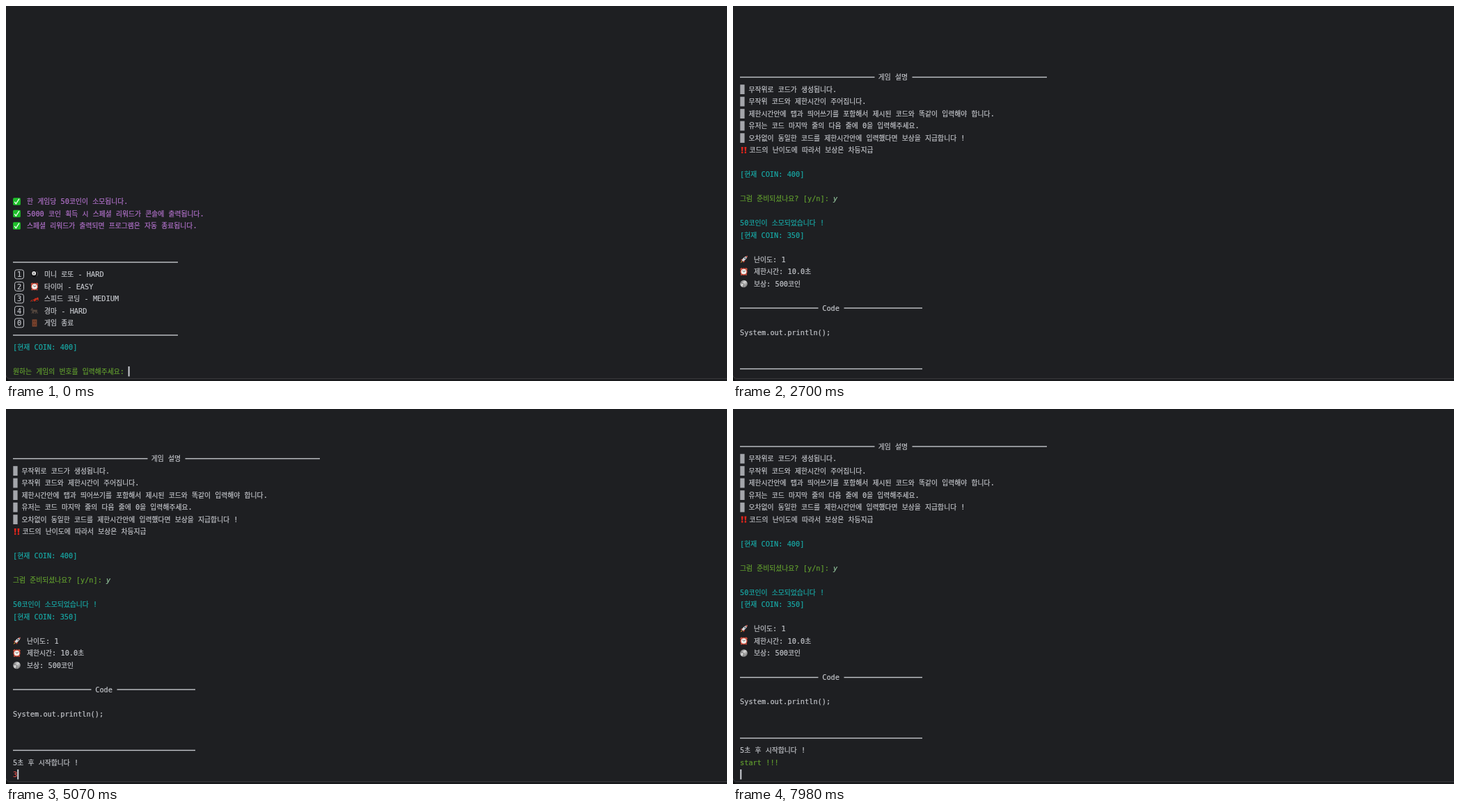
An HTML page for the animation above (8000 ms loop, 1036 px wide and 540 px high).

```html
<!DOCTYPE html>
<html lang="ko">
<head>
<meta charset="utf-8">
<title>Console game</title>
<style>
  html, body { margin: 0; width: 100%; height: 100%; overflow: hidden; background: #1e1f22; }
  svg { display: block; width: 100%; height: 100%; }
  text { white-space: pre; font: 10.3px "DejaVu Sans Mono", monospace; stroke-width: .18px; }
  .ko { font: 9.8px "Noto Sans CJK KR", "Noto Sans CJK JP", "Noto Sans CJK", sans-serif; }
  .time { font: 9.2px Inter, Roboto, sans-serif; }
  .input { font-style: italic; }
</style>
</head>
<body>
<svg id="stage" viewBox="0 0 1036 540">
  <defs>
    <linearGradient id="silver" x1="0" y1="0" x2="1" y2="1">
      <stop offset="0.1" stop-color="#6c6c6e"/><stop offset="0.45" stop-color="#d8d8d8"/><stop offset="1" stop-color="#555"/>
    </linearGradient>
    <!-- icons are centred on 0,0 -->
    <g id="check">
      <rect x="-5.4" y="-5.3" width="10.8" height="10.6" rx="1.6" fill="#1fbf2b"/>
      <path d="M-3.2 .4 L-1.2 3.4 L3.4 -3.9" fill="none" stroke="#f2fff2" stroke-width="1.3"/>
    </g>
    <g id="ball">
      <circle cy="-.8" r="4.8" fill="#0c0c0e"/>
      <path d="M2.6 -4.6 A4.6 4.6 0 0 1 2.6 2.8" fill="none" stroke="#6d6d70" stroke-width=".9"/>
      <circle cx="-.8" cy="-1.6" r="2.9" fill="#e4e4e4"/>
      <circle cx="-.9" cy="-2.4" r=".7" fill="#333"/><circle cx="-.9" cy="-.8" r=".8" fill="#333"/>
    </g>
    <g id="clock">
      <path d="M-5 -3 L-2.6 -5 M5 -3 L2.6 -5 M-3 3.5 L-4 5.2 M3 3.5 L4 5.2" stroke="#c5523f" stroke-width="1.8"/>
      <circle r="4.5" fill="#f1eeea" stroke="#cf4b3b" stroke-width="1.3"/>
      <path d="M-1.8 -1.4 L0 .2 L2.2 -1.2" fill="none" stroke="#333" stroke-width=".8"/>
    </g>
    <g id="car">
      <path d="M-5.7 4.2 L-5 2.2 L-.5 .8 L1 -1 L3 -.6 L3.6 -2 L5.6 -1.6 L5.8 3.6 Z" fill="#c5301f"/>
      <circle cx="-2.4" cy="3.7" r="1.7" fill="#111"/><circle cx="3.5" cy="3.4" r="2" fill="#111"/>
      <circle cx="-2.4" cy="3.7" r=".6" fill="#888"/><circle cx="3.5" cy="3.4" r=".7" fill="#888"/>
    </g>
    <g id="horse" transform="scale(-1 1)">
      <path d="M-4 -.8 L2 -1 L3.4 -3.6 L5 -1.4 L3.4 -.8 L2.6 1.4 L4 3.8 M2 1 L.8 4 M-3 1 L-4.6 3.8 M-2 1 L-1.6 4" fill="none" stroke="#50443d" stroke-width="1.2"/>
      <path d="M-4.2 -1 L2.4 -1.2 L2.6 1.2 L-3.4 1.4 Z" fill="#54483f"/>
      <path d="M-4 -.8 Q-5.4 0 -5.2 2" fill="none" stroke="#222" stroke-width="1"/>
    </g>
    <g id="door">
      <rect x="-3.4" y="-5.2" width="6.8" height="10.4" fill="#7d4630"/>
      <path d="M-2 -3.8 h1.4 v3 h-1.4z M.6 -3.8 h1.4 v3 h-1.4z M-2 .8 h1.4 v3 h-1.4z M.6 .8 h1.4 v3 h-1.4z" fill="#5d3020"/>
    </g>
    <g id="bang" fill="#e0261c">
      <path d="M-3.8 -4.6 h3 l-.7 6 h-1.6z M.9 -4.6 h3 l-.7 6 h-1.6z"/>
      <circle cx="-2.3" cy="3.4" r="1.3"/><circle cx="2.4" cy="3.4" r="1.3"/>
    </g>
    <g id="rocket">
      <path d="M-2.6 -.8 L-5 1.2 L-2 1.4 L-1 2.4 L-.6 5 L1.8 2.2 Z" fill="#c23a2c"/>
      <path d="M5.2 -5.2 Q1 -5 -3 1 L-1 3 Q5 -1 5.2 -5.2Z" fill="#d6d8da"/>
      <path d="M5.2 -5.2 L2.4 -4.5 L4.5 -2.4Z" fill="#c23a2c"/>
      <circle cx="1.8" cy="-1.8" r="1.1" fill="#4a5a68"/>
      <path d="M-3 2 L-5 5 L-2 3.2Z" fill="#f0a030"/>
    </g>
    <g id="coin"><circle r="5.3" fill="url(#silver)"/><path d="M-4.9 -2 L.5 .3 L-1 5" fill="none" stroke="#555" stroke-width=".7"/></g>
  </defs>

  <rect width="1036" height="540" fill="#1e1f22"/>
  <g id="menu"></g>
  <g id="game"></g>
  <rect id="caret" width="2" height="14.4" y="519" fill="#ced0d6"/>

  <g id="player" fill="#d8d8d8">
    <rect x="414.5" y="402" width="319" height="50" rx="6" fill="#1b2421"/>
    <path d="M547.5 413 v9.6 l-8.2 -4.8z M555.5 413 v9.6 l-8.2 -4.8z M593.5 413 v9.6 l8.2 -4.8z M601.3 413 v9.6 l8.2 -4.8z"/>
    <rect x="568" y="408.5" width="5.3" height="18.5" rx="1"/>
    <rect x="576" y="408.5" width="5.3" height="18.5" rx="1"/>
    <g fill="none" stroke="#b8b8b8">
      <path d="M664 421.5 h-3.2 q-1.5 0 -1.5 -1.5 v-6.4 q0 -1.5 1.5 -1.5 h8.6 q1.5 0 1.5 1.5 v2"/>
      <path d="M662 416.8 v-2.2 h2.2 M662 414.6 l3 3"/>
      <path d="M692.4 415.3 h-2.6 v8.2 h9.2 v-8.2 h-2.6 M694.4 419.5 v-8 M691.8 413.8 l2.6 -2.6 l2.6 2.6"/>
      <path d="M715.6 413.2 l4.3 4.4 l-4.3 4.4 M720.6 413.2 l4.3 4.4 l-4.3 4.4"/>
    </g>
    <rect x="665" y="416.8" width="8.8" height="6.6" rx="1.2" fill="#b8b8b8"/>
    <rect x="458" y="439.4" width="233" height="2" rx="1" fill="#56575a"/>
    <rect x="458" y="439.4" width="87" height="2" rx="1" fill="#958a8c"/>
    <rect x="543.8" y="435.2" width="2" height="10.6" rx="1"/>
    <text id="elapsed" class="time" x="423.4" y="443.6" fill="#bebebe"></text>
    <text class="time" x="701.4" y="443.6" fill="#bebebe">01:48</text>
  </g>

  <path d="M0 533 Q1 540 7 540 H0Z" fill="#0e0f10"/>
  <path d="M0 532 Q1 536.5 6 536.5 H1036" fill="none" stroke="#38373a" stroke-width="1"/>
  <rect x="5" y="538.6" width="1031" height="1.4" fill="#17181a"/>
</svg>
<script>
const NS = 'http://www.w3.org/2000/svg';
const LOOP = 8000, LEFT = 10, CELL = 6.2, ROW = 17.5;
const C = { white: '#c4c6cb', purple: '#b272cb', green: '#629f2f', cyan: '#18a9a6', red: '#e0504c', input: '#93c49c' };
const $ = id => document.getElementById(id);

function add(parent, tag, attrs, content) {
  const el = document.createElementNS(NS, tag);
  for (const k in attrs) el.setAttribute(k, attrs[k]);
  if (content) el.textContent = content;
  return parent.appendChild(el);
}

function tint(el, color) {
  el.setAttribute('fill', color);
  el.setAttribute('stroke', color);
}

// Hangul and Latin runs use their own font
function write(parent, x, y, str, color = C.white, cls = '') {
  const el = add(parent, 'text', { x, y: y + 3.7, class: cls });
  tint(el, color);
  for (const run of str.split(/([\uac00-\ud7a3]+)/)) {
    if (run) add(el, 'tspan', /[\uac00-\ud7a3]/.test(run) ? { class: 'ko' } : {}, run);
  }
  return el;
}
const rule = (g, x1, x2, y) => add(g, 'rect', { x: x1, y: y - 0.7, width: x2 - x1, height: 1.4, fill: C.white });
const icon = (g, name, x, y) => add(g, 'use', { href: '#' + name, x, y });
const show = (el, on) => el.setAttribute('visibility', on ? 'visible' : 'hidden');
const clamp = v => Math.max(0, Math.min(1, v));

// Menu
const menu = $('menu');
['한 게임당 50코인이 소모됩니다.',
 '5000 코인 획득 시 스페셜 리워드가 콘솔에 출력됩니다.',
 '스페셜 리워드가 출력되면 프로그램은 자동 종료됩니다.'].forEach((s, i) => {
  const y = 281.5 + i * ROW;
  icon(menu, 'check', 15.5, y);
  write(menu, 30, y, s, C.purple);
});
rule(menu, 10, 247, 369);
[['1', 'ball', '미니 로또 - HARD'], ['2', 'clock', '타이머 - EASY'], ['3', 'car', '스피드 코딩 - MEDIUM'],
 ['4', 'horse', '경마 - HARD'], ['0', 'door', '게임 종료']].forEach(([key, pic, s], i) => {
  const y = 386.5 + i * ROW;
  add(menu, 'rect', { x: 12.5, y: y - 6.6, width: 13, height: 13, rx: 3, fill: 'none', stroke: C.white });
  write(menu, 15.9, y, key);
  icon(menu, pic, 41, y);
  write(menu, 55, y, s);
});
rule(menu, 10, 247, 474);
write(menu, LEFT, 491.5, '[현재 COIN: 400]', C.cyan);
write(menu, LEFT, 526.5, '원하는 게임의 번호를 입력해주세요: ', C.green);
const choice = write(menu, 176, 526.5, '3', C.input, 'input');

// Game log, rows counted from its title
const game = $('game'), at = n => n * ROW;
rule(game, 10, 203.5, 0);
write(game, 208.8, 0, '게임 설명');
rule(game, 257.5, 451, 0);
['무작위로 코드가 생성됩니다.',
 '무작위 코드와 제한시간이 주어집니다.',
 '제한시간안에 탭과 띄어쓰기를 포함해서 제시된 코드와 똑같이 입력해야 합니다.',
 '유저는 코드 마지막 줄의 다음 줄에 0을 입력해주세요.',
 '오차없이 동일한 코드를 제한시간안에 입력했다면 보상을 지급합니다 !'].forEach((s, i) => {
  const y = at(i + 1);
  add(game, 'rect', { x: 10.3, y: y - 6.8, width: 6.3, height: 13.8, fill: '#a4a6ab' });
  write(game, 22.5, y, s);
});
icon(game, 'bang', 15.5, at(6));
write(game, 23.4, at(6), '코드의 난이도에 따라서 보상은 차등지급');
write(game, LEFT, at(8), '[현재 COIN: 400]', C.cyan);
write(game, LEFT, at(10), '그럼 준비되셨나요? [y/n]: ', C.green);
const answer = write(game, 144, at(10), 'y', C.input, 'input');

const round = add(game, 'g', {});
write(round, LEFT, at(12), '50코인이 소모되었습니다 !', C.cyan);
write(round, LEFT, at(13), '[현재 COIN: 350]', C.cyan);
[['rocket', '난이도: 1'], ['clock', '제한시간: 10.0초'], ['coin', '보상: 500코인']].forEach(([pic, s], i) => {
  icon(round, pic, 15.5, at(15 + i));
  write(round, 30, at(15 + i), s);
});
rule(round, 10, 122.5, at(19));
write(round, 128.2, at(19), 'Code');
rule(round, 159.5, 272, at(19));
write(round, LEFT, at(21), 'System.out.println();');
rule(round, 10, 272, at(24));

const countdown = add(game, 'g', {});
write(countdown, LEFT, at(25), '5초 후 시작합니다 !');
const status = write(countdown, LEFT, at(26), '5');

const T = { typed: 1320, help: 1620, answered: 2340, round: 2700, count: 3210, start: 6900 };
const ticks = [T.count, 4140, 5070, 5940, 6840];

// Caret x, or null while it is off
function caretAt(t, tick) {
  if (t < T.typed) return 175.6;
  if (t < T.help) return 181.8;
  if (t < T.answered) return t < 2130 ? 144 : null;
  if (t < T.round) return 150.2;
  if (t < T.count) return null;
  if (t < T.start) return t - ticks[tick] < 360 ? LEFT + CELL : null;
  return 10.3;
}

function update(t) {
  show(menu, t < T.help);
  show(choice, t >= T.typed && t < T.help);
  show(game, t >= T.help);
  show(answer, t >= T.answered);
  show(round, t >= T.round);
  show(countdown, t >= T.count);

  const top = t < T.round ? 351.5 : t < T.count ? 102.5 : t < T.start ? 71.5 : 54;
  game.setAttribute('transform', `translate(0 ${top})`);

  const tick = ticks.filter(s => t >= s).length - 1;
  const started = t >= T.start;
  status.textContent = started ? 'start !!!' : String(5 - Math.max(0, tick));
  tint(status, started ? C.green : tick < 2 ? C.cyan : C.red);

  const x = caretAt(t, tick);
  show($('caret'), x !== null);
  if (x !== null) $('caret').setAttribute('x', x);

  const fade = clamp((t - 30) / 330) * (1 - clamp((t - 1350) / 300));
  $('player').setAttribute('opacity', fade);
  $('elapsed').textContent = t < 1140 ? '00:39' : '00:40';
}

// Visibility inherits per element, so nested parts only hide through their group
[answer, round, countdown, choice].forEach(el => el.setAttribute('visibility', 'hidden'));

const begin = performance.now();
function frame() {
  update((performance.now() - begin) % LOOP);
  requestAnimationFrame(frame);
}
update(0);
requestAnimationFrame(frame);
</script>
</body>
</html>
```
